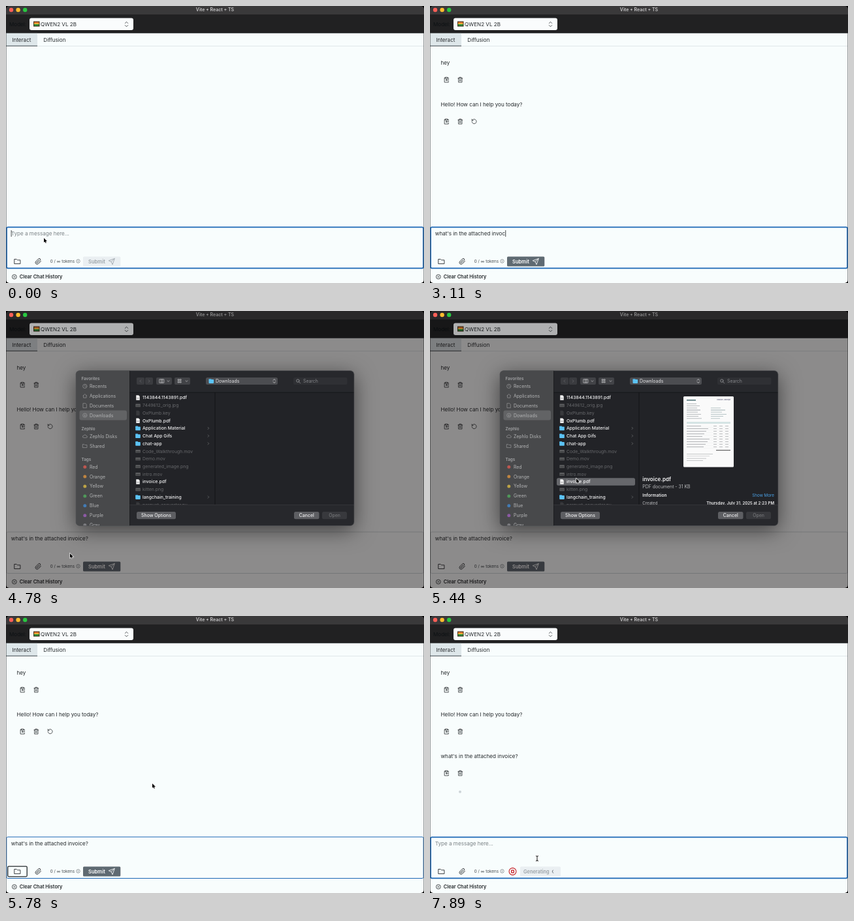
An HTML page with a canvas for the animation above (8000 ms loop, 640 px wide and 425 px high).

```html
<!DOCTYPE html>
<html lang="en">
<head>
<meta charset="utf-8">
<style>
html, body { margin: 0; width: 100%; height: 100%; overflow: hidden; background: #000; }
canvas { display: block; width: 640px; height: 425px; }
</style>
</head>
<body>
<canvas id="stage"></canvas>
<script>
const W = 640, H = 425, LOOP = 8000, FPS = 9;
const dpr = window.devicePixelRatio || 1;
const stage = document.getElementById('stage');
const sheet = document.createElement('canvas');
const [page, panel] = [stage, sheet].map(c => {
  c.width = W * dpr;
  c.height = H * dpr;
  const ctx = c.getContext('2d');
  ctx.scale(dpr, dpr);
  return ctx;
});
let g = page;

const INK = '#25292c', PAPER = '#f8fdfd';
const QUESTION = "what's in the attached invoice?";
const STEM = QUESTION.slice(0, 23);

// Drawing helpers
const ramp = (v, a, b) => Math.min(1, Math.max(0, (v - a) / (b - a)));

function rect(x, y, w, h, color, r = 0) {
  g.fillStyle = color;
  g.beginPath();
  g.roundRect(x, y, w, h, r);
  g.fill();
}

function frame(x, y, w, h, color, lw, r = 0) {
  g.strokeStyle = color;
  g.lineWidth = lw;
  g.beginPath();
  g.roundRect(x, y, w, h, r);
  g.stroke();
}

function dot(x, y, r, color) {
  g.fillStyle = color;
  g.beginPath();
  g.arc(x, y, r, 0, 7);
  g.fill();
}

function ring(x, y, r, color, lw, from = 0, to = 7) {
  g.strokeStyle = color;
  g.lineWidth = lw;
  g.beginPath();
  g.arc(x, y, r, from, to);
  g.stroke();
}

function text(s, x, y, size = 8.1, color = INK, weight = 400, align = 'left') {
  g.font = `${weight} ${size}px Inter, "Open Sans", sans-serif`;
  g.textAlign = align;
  g.fillStyle = color;
  g.fillText(s, x, y + size * 0.36);
}

// Icons live on a 24 unit grid and are centred on x, y.
function icon(d, x, y, size, color = INK, lw = 2, fill = false) {
  const k = size / 24;
  g.save();
  g.translate(x - size / 2, y - size / 2);
  g.scale(k, k);
  g.lineWidth = lw;
  g.lineCap = g.lineJoin = 'round';
  g.strokeStyle = g.fillStyle = color;
  const p = new Path2D(d);
  if (fill) g.fill(p); else g.stroke(p);
  g.restore();
}

const ICON = {
  updown: 'M6 8l6-6 6 6M6 16l6 6 6-6',
  copy: 'M8 4H4v18h16v-4M16 4h4v5M8 2h8v5H8zM21 13H10M14 9l-4 4 4 4',
  trash: 'M3 6h18M19 6v16H5V6M8 6V2h8v4M10 11v6M14 11v6',
  redo: 'M3 12a9 9 0 1 0 3-6.7L3 8M3 3v5h5',
  folder: 'M2 4h7l3 3h10v13H2z',
  clip: 'M21 11l-9 9a6 6 0 0 1-8.5-8.5l9-9a4 4 0 0 1 5.7 5.7l-9 9a2 2 0 0 1-2.8-2.8l8-8',
  send: 'M22 2L2 9l9 4 4 9zM22 2L11 13',
  right: 'M9 5l7 7-7 7',
  left: 'M15 5l-7 7 7 7',
  down: 'M5 9l7 7 7-7',
  find: 'M17 10a7 7 0 1 1-14 0a7 7 0 1 1 14 0M15 15l7 7',
  doc: 'M4 1h11l5 5v17H4z',
  house: 'M3 11l9-8 9 8M5 10v11h14V10',
  cloud: 'M6 19a5 5 0 0 1 0-10a7 7 0 0 1 13 1a4.5 4.5 0 0 1 0 9z',
  columns: 'M2 4h20v16H2zM9 4v16M15 4v16',
  grid: 'M3 4h5v5H3zM12 4h5v5h-5zM3 14h5v5H3zM12 14h5v5h-5z'
};

// Timeline, counted in ticks of 1/9 s
const DRAFTS = [
  [0, ''], [1, 'hey'], [2, ''], [6, 'w'], [7, 'wh'], [8, 'wha'], [9, 'what'], [10, 'whats'],
  [11, 'whats i'], [12, 'whats'], [13, 'what'], [14, QUESTION],
  [22, STEM + 'inv'], [23, STEM + 'invoc'], [24, STEM + 'invocie?'], [26, STEM + 'invocie'],
  [27, STEM + 'invoci'], [28, STEM + 'invoc'], [29, STEM + 'invo'], [30, STEM + 'invoi'],
  [31, STEM + 'invo'], [33, STEM + 'invoi'], [34, STEM + 'invoic'], [35, QUESTION], [57, '']
];
const MOUSE = [
  [37, 58, 358], [40, 18, 390], [41, 22, 390], [43, 98, 372], [44, 98, 372], [47, 224, 257],
  [52, 224, 257], [56, 145, 390], [58, 143, 391], [59, 143, 391], [63, 164, 372]
];

function draftAt(n) {
  const s = DRAFTS.filter(d => d[0] <= n).pop()[1];
  return n >= 14 && n < 22 ? s.slice(0, 9 + Math.round((n - 14) * 16 / 7)) : s;
}

function mouseAt(n) {
  if (n < 1) return [58, 356];
  if (n < 37) return null;
  const i = MOUSE.findIndex(p => p[0] > n);
  if (i < 0) return MOUSE[MOUSE.length - 1].slice(1);
  const [a, b] = [MOUSE[i - 1], MOUSE[i]];
  const k = ramp(n, a[0], b[0]);
  return [a[1] + (b[1] - a[1]) * k, a[2] + (b[2] - a[2]) * k];
}

// Window
function drawLights() {
  ['#fe5f57', '#febc2e', '#28c840'].forEach((c, i) => dot(8 + 10.6 * i, 6, 3.2, c));
}

function drawChrome() {
  rect(0, 0, W, H, PAPER);
  rect(0, 0, W, 13, '#3a393a');
  rect(0, 13, W, 28.5, '#212122');
  text('Vite + React + TS', 320, 5.7, 7, '#c9c8c9', 600, 'center');
  text('Model:', 5, 28, 8.1, '#0d1114');
  rect(36, 18.5, 159, 18.5, '#fafcfd', 3);
  rect(42, 23.5, 9.5, 8, '#3c2d17');
  rect(43, 24.5, 7.5, 3, '#e2702c');
  rect(43, 26.5, 7.5, 1.5, '#f0c63d');
  rect(43, 28, 7.5, 2.5, '#2d8a3c');
  text('QWEN2 VL 2B', 53, 28);
  icon(ICON.updown, 184.5, 28, 9, INK, 2);

  rect(0, 41.5, 48, 20, '#dee7ea');
  rect(48, 61, W - 48, 0.8, '#d9e0e3');
  rect(0, 60.7, 48, 1.1, '#3f474c');
  text('Interact', 9.3, 51.7);
  text('Diffusion', 57.3, 51.7);

  ring(12.8, 415.5, 3.4, INK, 0.8);
  icon('M5 5l14 14M19 5L5 19', 12.8, 415.5, 4, INK, 4);
  text('Clear Chat History', 20.8, 415.5, 7.4, INK, 600);
}

function message(s, y, redo, tools = true) {
  text(s, 16.5, y);
  if (!tools) return;
  icon(ICON.copy, 25.2, y + 26.5, 9.2);
  icon(ICON.trash, 46.3, y + 26.5, 9.2);
  if (redo) icon(ICON.redo, 67.6, y + 26.5, 9.2);
}

function drawDots(y, t) {
  for (let i = 0; i < 3; i++) {
    const glow = Math.max(0, Math.cos((t / 870 - i / 3) * Math.PI * 2));
    g.globalAlpha = glow;
    dot(18 + 14 * i, y, 1 + glow, '#cdd4d8');
  }
  g.globalAlpha = 1;
}

function drawChat(n, t) {
  const reply = 'Hello! How can I help you today?';
  if (n >= 2) message('hey', 86.7, false);
  if (n === 2) drawDots(142, t);
  if (n === 3) message(reply.slice(0, 14), 150.7, false, false);
  if (n >= 4) message(reply, 150.7, n < 57);
  if (n >= 57) {
    message(QUESTION, 214.6, false);
    drawDots(269.7, t - 58000 / FPS);
  }
}

function drawComposer(n, t) {
  const draft = draftAt(n);
  const busy = n === 2 || n === 3 || n >= 57;
  const folderFocus = n >= 50 && n < 57;
  if (folderFocus) frame(0.8, 339, W - 1.6, 63.5, '#1b66b5', 1, 2);
  else if (n < 40 || n >= 57) frame(1, 339.3, W - 2, 63, '#1b66b5', 1.7, 2);
  else frame(0.8, 339, W - 1.6, 63.5, '#c4cdd1', 0.8, 2);

  if (draft) text(draft, 7.8, 349);
  else text('Type a message here...', 7.8, 349, 8.1, '#7b8286');
  const blink = n >= 58 ? Math.floor((n - 58) / 4) % 2 === 0 : n < 37;
  if (blink) {
    const x = draft ? 8.1 + g.measureText(draft).width : 7.7;
    rect(x, 344, 0.8, 10, '#1c1f21');
  }

  if (folderFocus) frame(2.7, 384.2, 29.5, 15.6, '#22272a', 1.3, 1.5);
  icon(ICON.folder, 17.5, 392, 10.5);
  icon(ICON.clip, 49.5, 392, 10.5);
  text('0 / ∞ tokens', 67.8, 392, 6.3, '#43494d');
  ring(110.5, 391.5, 2.7, '#555c60', 0.6);
  rect(110.2, 391, 0.6, 1.8, '#555c60');
  rect(110.2, 389.8, 0.6, 0.7, '#555c60');

  if (busy) {
    ring(126.5, 392, 5.4, '#c4161c', 1.1);
    frame(124.6, 390.1, 3.8, 3.8, '#c4161c', 1.2, 0.6);
    rect(138, 384.4, 62, 15.2, '#eaeff2', 1.5);
    text('Generating', 143, 392, 7.4, '#9aa1a6', 600);
    const a = (t - 58000 / FPS) / 580 * Math.PI * 2;
    ring(190.6, 392, 3.1, '#5d666c', 1, a - 0.9, a + 0.9);
  } else {
    const fg = draft ? '#fff' : '#9ba3a8';
    rect(118, 384.4, 57.3, 15.2, draft ? '#5f6a72' : '#eaeff2', 1.5);
    text('Submit', 126, 392, 7.6, fg, 600);
    icon(ICON.send, 161.6, 392, 10.5, fg, 1.9);
  }
}

function drawEdges() {
  g.strokeStyle = 'rgba(40,44,46,.75)';
  g.lineWidth = 0.8;
  g.strokeRect(0.2, 41.5, W - 0.4, H);
  g.fillStyle = '#000';
  g.beginPath();
  g.rect(0, 0, W, H);
  g.roundRect(0, 0, W, H, 5);
  g.fill('evenodd');
}

// File panel
const BOX = [107, 91.5, 426, 238];
const PLACES = [
  ['Recents', 115.4, 'M22 12a10 10 0 1 1-20 0a10 10 0 1 1 20 0M12 6v6l4 3'],
  ['Applications', 130.3, ICON.house],
  ['Documents', 145.2, ICON.doc],
  ['Downloads', 160.1, 'M22 12a10 10 0 1 1-20 0a10 10 0 1 1 20 0M12 7v10M8 13l4 4 4-4'],
  ['Zephlo Disks', 192.2, ICON.cloud],
  ['Shared', 207.1, ICON.folder]
];
const TAGS = {
  Red: '#bd5750', Orange: '#bf8440', Yellow: '#bda345', Green: '#4f9859',
  Blue: '#427bb5', Purple: '#8c5aa5', Gray: '#7c7c80'
};
const FILES = [
  '1143844.1143891.pdf', '7449612_orig.jpg', 'OxPlumb.key', 'OxPlumb.pdf', 'Application Material',
  'Chat App Gifs', 'chat-app', 'Code_Walkthrough.mov', 'Demo.mov', 'generated_image.png',
  'intro.mov', 'invoice.pdf', 'kitten.png', 'langchain_training', 'parquet_converter.py'
];

function blueFolder(x, y) {
  rect(x - 3.8, y - 3.3, 4, 2, '#4db4ea', 0.6);
  rect(x - 3.8, y - 2.5, 7.6, 5.9, '#5cc3f5', 0.8);
}

function drawSidebar() {
  rect(107, 91, 82.5, 239, '#48494b');
  for (const [s, y] of [['Favorites', 104], ['Zephlo', 181], ['Tags', 227.8]])
    text(s, 115.5, y, 6.3, '#a3a4a6', 600);
  rect(112.5, 152.5, 72.5, 15, '#626365', 3);
  for (const [s, y, d] of PLACES) {
    icon(d, 120.8, y, 7.5, '#a0a1a3', 2);
    text(s, 128, y, 6.9, '#b4b5b6');
  }
  Object.entries(TAGS).forEach(([s, c], i) => {
    dot(120.8, 239.2 + 14.9 * i, 2.5, c);
    text(s, 128, 239.2 + 14.9 * i, 6.9, '#b4b5b6');
  });
}

function drawFiles(picked) {
  FILES.forEach((s, i) => {
    const y = 133 + 11.73 * i;
    const folder = !/\./.test(s), open = folder || s.endsWith('pdf');
    if (picked && s === 'invoice.pdf') rect(194, y - 5.8, 120, 11.6, '#66676b', 2.5);
    if (folder) {
      blueFolder(202, y);
      icon(ICON.right, 309.8, y, 5.5, '#8a8b8e', 2.4);
    } else if (open) {
      icon(ICON.doc, 202, y, 8.2, '#f2f2f2', 1, true);
      rect(200.3, y + 0.3, 3.4, 1.2, '#a6a6a8');
    } else if (/mov|png|jpg/.test(s)) {
      rect(198.4, y - 2.2, 7.4, 4.6, '#5d5e60', 0.5);
      rect(199.2, y - 0.2, 5.8, 1.8, '#434446');
    } else {
      icon(ICON.doc, 202, y, 8, '#38393c', 1, true);
    }
    text(s, 209, y, 6.85, open ? '#f4f4f5' : '#67686b', open ? 500 : 400);
  });
}

function drawPreview() {
  rect(388, 131, 77, 108.5, '#fafafa', 1.5);
  rect(393, 136, 14, 1.4, '#4a6f74');
  text('Invoice / Receipt', 460, 136, 2.6, '#446', 500, 'right');
  for (let i = 0; i < 8; i++) {
    const y = 142 + i * 3.2;
    rect(393, y, 15 + i * 5 % 9, 0.8, '#a0a6a9');
    if (i > 1) rect(430, y, 13 + i * 7 % 12, 0.8, '#9fb2b4');
  }
  rect(393, 170, 67, 3, '#d5e4e4');
  for (let i = 0; i < 9; i++) {
    const y = 176 + i * 4;
    rect(393, y, 22 + i * 11 % 14, 0.8, '#9a9da0');
    for (let j = 0; j < 3; j++) rect(434 + j * 9, y, 5, 0.8, '#a6a9ab');
    rect(393, y + 2, 67, 0.3, '#dcdddd');
  }
  rect(438, 213, 22, 1.2, '#666');
  for (let i = 0; i < 4; i++) rect(393, 219 + i * 3.4, 40 - i * 5, 0.7, '#b2b4b6');

  text('invoice.pdf', 325.3, 258, 8.1, '#f1f1f2', 600);
  text('PDF document - 31 KB', 325.3, 269.7, 6.9, '#b9babc');
  text('Information', 325.3, 282.3, 6.7, '#f1f1f2', 600);
  text('Show More', 527, 282.6, 6.3, '#4ba3e8', 400, 'right');
  text('Created', 325.3, 295, 6.1, '#a6a7aa', 500);
  text('Thursday, July 31, 2025 at 2:23 PM', 527, 295, 6.1, '#f1f1f2', 600, 'right');
}

function drawToolbar() {
  rect(200, 102, 12, 11, '#3a3b3f', 2);
  rect(213, 102, 12, 11, '#3a3b3f', 2);
  icon(ICON.left, 206, 107.5, 6, '#77787b', 2.4);
  icon(ICON.right, 219, 107.5, 6, '#77787b', 2.4);
  [[230, ICON.columns], [258, ICON.grid]].forEach(([x, d]) => {
    rect(x, 102, 24, 11, '#424347', 2);
    icon(d, x + 8.5, 107.5, 8, '#d6d6d8', 2);
    icon(ICON.down, x + 18.5, 107.5, 5, '#d6d6d8', 3);
  });
  rect(306, 102, 110, 11, '#4c4d51', 2.5);
  blueFolder(314.3, 107.5);
  text('Downloads', 321, 107.5, 6.9, '#e6e6e8');
  icon(ICON.updown, 410.8, 107.5, 7, '#e6e6e8', 2.6);
  rect(440, 102, 82.5, 11, '#2f3034', 2.5);
  icon(ICON.find, 447.5, 107.7, 7.5, '#b4b5b8', 2);
  text('Search', 455, 107.7, 6.9, '#85868a');
}

function pushButton(s, x, w, bg, fg) {
  rect(x, 308, w, 11.2, bg, 2.5);
  text(s, x + w / 2, 313.6, 6.9, fg, 500, 'center');
}

function drawPanel(picked) {
  g.clearRect(0, 0, W, H);
  g.save();
  g.shadowColor = 'rgba(0,0,0,.55)';
  g.shadowBlur = 32 * dpr;
  g.shadowOffsetY = 7 * dpr;
  rect(...BOX, '#27282c', 6);
  g.restore();

  g.save();
  g.beginPath();
  g.roundRect(...BOX, 6);
  g.clip();
  drawSidebar();
  drawToolbar();
  rect(189.5, 125, 344, 172, '#222327');
  g.save();
  g.beginPath();
  g.rect(189.5, 125, 344, 172);
  g.clip();
  drawFiles(picked);
  if (picked) drawPreview();
  g.restore();
  rect(189, 91, 0.8, 239, '#18191b');
  rect(189.5, 124.6, 344, 0.8, '#151618');
  rect(319.6, 125, 0.9, 172, '#111214');
  rect(189.5, 297, 344, 0.8, '#38393d');
  pushButton('Show Options', 200, 60, '#5d5e62', '#f1f1f2');
  pushButton('Cancel', 441, 38.5, '#5d5e62', '#f1f1f2');
  pushButton('Open', 484, 38, '#38393d', '#737477');
  g.restore();
  frame(...BOX, '#55565a', 0.6, 6);
}

function drawBeam() {
  const beam = new Path2D('M-2-4Q0-4 0-2.5Q0-4 2-4M0-2.5V3M-2 4Q0 4 0 2.5Q0 4 2 4');
  g.strokeStyle = '#fff';
  g.lineWidth = 1.8;
  g.stroke(beam);
  g.strokeStyle = '#000';
  g.lineWidth = 0.9;
  g.stroke(beam);
}

function drawArrow() {
  const arrow = new Path2D('M0 0V6.8L1.6 5.4L2.6 7.7L3.8 7.2L2.8 4.9H5z');
  g.strokeStyle = '#fff';
  g.lineWidth = 1.2;
  g.stroke(arrow);
  g.fillStyle = '#000';
  g.fill(arrow);
}

function drawMouse(n, fading) {
  const pos = mouseAt(n);
  if (!pos) return;
  g.save();
  g.translate(...pos);
  if (n >= 61 || fading) drawBeam(); else drawArrow();
  g.restore();
}

function draw(ms) {
  const n = Math.floor((ms + 5) * FPS / 1000);
  const t = n * 1000 / FPS;
  g = page;
  drawChrome();
  drawChat(n, t);
  drawComposer(n, t);
  drawEdges();

  const closing = ramp(n, 50, 52);
  const shown = Math.min(ramp(n, 41, 43), 1 - closing);
  const shade = Math.sqrt(shown);
  if (shown > 0) {
    rect(0, 0, W, 41.5, `rgba(0,0,0,${0.3 * shade})`);
    rect(0, 41.5, W, H, `rgba(7,0,0,${0.45 * shade})`);
    g = panel;
    drawPanel(n >= 49);
    g = page;
    g.globalAlpha = shown;
    g.drawImage(sheet, 0, -14 * (1 - shown), W, H);
    g.globalAlpha = 1;
  }
  drawLights();
  drawMouse(n, closing > 0 && closing < 1);
}

const start = performance.now();
function tick() {
  draw((performance.now() - start) % LOOP);
  requestAnimationFrame(tick);
}
tick();
</script>
</body>
</html>
```
